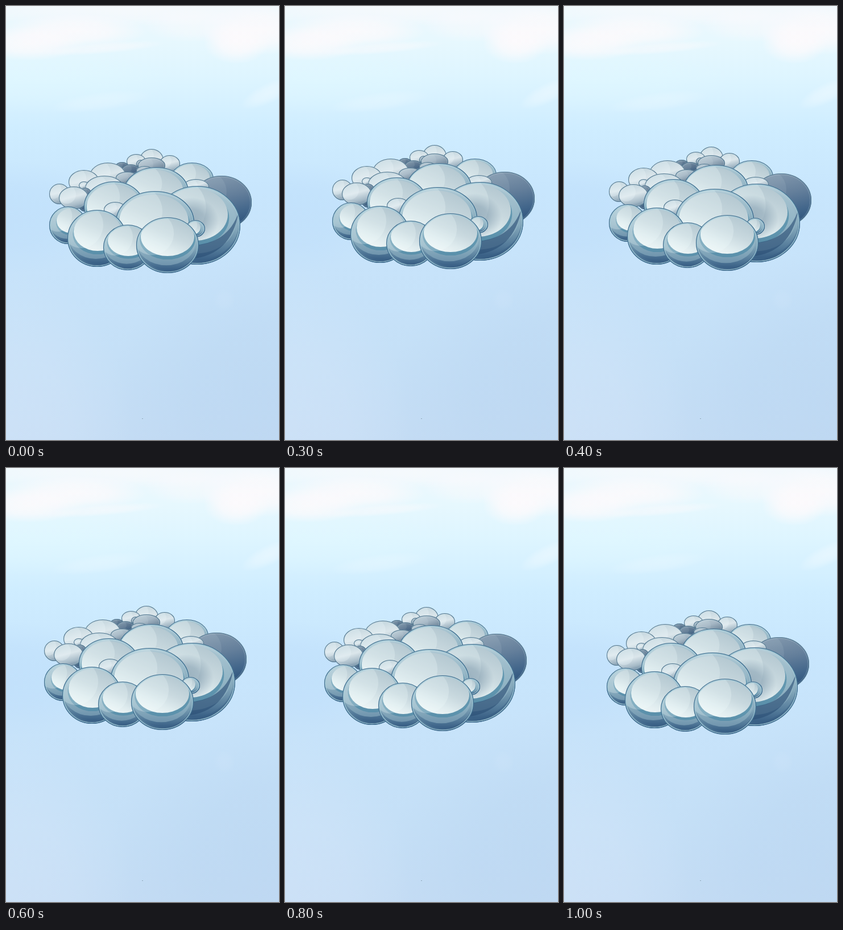
These frames come from a looping animation (480 by 762 pixels, 1.1 s). An HTML page with a canvas:

```html
<!DOCTYPE html>
<html lang="en">
<head>
<meta charset="utf-8">
<title>Drifting cloud</title>
<style>
html, body { margin: 0; width: 100%; height: 100%; overflow: hidden; }
canvas { display: block; width: 100%; height: 100%; }
</style>
</head>
<body>
<canvas id="stage" width="480" height="762"></canvas>
<script>
const W = 480, H = 762, LOOP = 1100;
const stage = document.getElementById('stage').getContext('2d');

function layer(paint) {
  const c = document.createElement('canvas');
  c.width = W;
  c.height = H;
  paint(c.getContext('2d'));
  return c;
}

function fade(g, x0, y0, x1, y1, stops) {
  const f = g.createLinearGradient(x0, y0, x1, y1);
  stops.forEach(([p, color]) => f.addColorStop(p, color));
  return f;
}

function oval(g, x, y, rx, ry, turn = 0) {
  g.beginPath();
  g.ellipse(x, y, rx, ry, turn, 0, Math.PI * 2);
}

// Soft elliptical puff
function puff(g, x, y, rx, ry, alpha, rgb = '253,250,252', turn = 0) {
  g.save();
  g.translate(x, y);
  g.rotate(turn);
  g.scale(rx, ry);
  const f = g.createRadialGradient(0, 0, 0, 0, 0, 1);
  f.addColorStop(0, `rgba(${rgb},${alpha})`);
  f.addColorStop(0.5, `rgba(${rgb},${alpha * 0.75})`);
  f.addColorStop(1, `rgba(${rgb},0)`);
  g.fillStyle = f;
  g.fillRect(-1, -1, 2, 2);
  g.restore();
}

const sky = layer(g => {
  g.fillStyle = fade(g, 0, 0, 0, H, [
    [0, '#edf8fd'], [0.08, '#e7f8fe'], [0.16, '#def5ff'], [0.28, '#cfedff'],
    [0.42, '#c8e6fd'], [0.6, '#c7e3fa'], [0.8, '#c5e0f7'], [1, '#c4dcf4']
  ]);
  g.fillRect(0, 0, W, H);
  puff(g, 480, 690, 300, 260, 0.5, '184,212,240');
  puff(g, 0, 740, 220, 280, 0.4, '216,232,250');
  puff(g, 0, 370, 190, 100, 0.35, '184,218,250');
  puff(g, 60, 130, 240, 60, 0.35, '226,250,255');
  puff(g, 240, 8, 330, 28, 0.5);
  puff(g, 40, 66, 100, 30, 0.85);
  puff(g, 120, 44, 130, 30, 0.85);
  puff(g, 170, 74, 110, 10, 0.5, '253,250,252', -0.08);
  puff(g, 405, 64, 58, 38, 0.9);
  puff(g, 450, 42, 110, 44, 0.9);
  puff(g, 330, 34, 90, 30, 0.45);
  puff(g, 165, 168, 90, 17, 0.25, '244,251,255', -0.13);
  puff(g, 462, 153, 55, 18, 0.45, '244,251,255', -0.45);
  puff(g, 384, 516, 20, 20, 0.15, '220,235,252');
  g.fillStyle = '#90a8ba';
  g.fillRect(239, 724, 2, 1);
});

const tones = {
  pale: [[0, '#c2d5dd'], [0.45, '#dbe6eb'], [0.8, '#a6bac7'], [1, '#718da4']],
  gray: [[0, '#b9cad4'], [0.4, '#a4b6c4'], [1, '#60798f']],
  dusk: [[0, '#7890a5'], [0.5, '#5c7690'], [1, '#3d5f81']],
  deep: [[0, '#8298ad'], [0.4, '#647f9b'], [0.75, '#41658a'], [1, '#2b5079']],
  glass: [[0, '#9dbdcb'], [0.45, '#789db3'], [0.8, '#507898'], [1, '#31577e']]
};

function bubble(g, tone, x, y, rx, ry, core) {
  g.save();
  oval(g, x, y, rx, ry);
  g.clip();
  g.fillStyle = fade(g, x - rx * 0.2, y - ry, x + rx * 0.2, y + ry, tones[tone]);
  g.fillRect(x - rx, y - ry, rx * 2, ry * 2);

  if (core) {
    const [cx, cy, cw, ch] = core;
    // Dark lower bowl, then thin teal shells around the pale core
    oval(g, x, y - ry * 0.04, rx * 0.96, ry * 0.93);
    g.fillStyle = fade(g, 0, y - ry, 0, y + ry, [
      [0, '#b9d0da'], [0.55, '#84a8bb'], [0.8, '#547b9a'], [1, '#2e547d']
    ]);
    g.fill();
    oval(g, x - rx * 0.04, y - ry * 0.1, rx * 0.94, ry * 0.82);
    g.fillStyle = 'rgba(155,188,203,0.48)';
    g.fill();
    oval(g, cx, cy + ch * 0.13, cw * 1.04, ch * 1.05);
    g.fillStyle = 'rgba(77,139,167,0.7)';
    g.fill();
    oval(g, cx, cy, cw, ch);
    g.fillStyle = fade(g, cx + cw * 0.35, cy - ch, cx - cw * 0.3, cy + ch, [
      [0, '#b4c8d1'], [0.45, '#c9d9df'], [0.75, '#deebee'], [1, '#edf5f6']
    ]);
    g.fill();
    oval(g, x - rx * 0.48, y - ry * 0.42, rx * 0.68, ry * 0.78, 0.45);
    g.fillStyle = 'rgba(238,250,252,0.25)';
    g.fill();
  } else {
    oval(g, x - rx * 0.45, y - ry * 0.3, rx * 0.6, ry * 0.8, 0.4);
    g.fillStyle = `rgba(238,248,252,${tone === 'pale' ? 0.28 : 0.08})`;
    g.fill();
  }

  // Bright inner rim
  oval(g, x, y, rx - 2, ry - 2);
  g.lineWidth = core ? 1.5 : 0.8;
  g.strokeStyle = core ? 'rgba(166,204,217,0.8)' : 'rgba(190,214,224,0.35)';
  g.stroke();
  g.restore();
  oval(g, x, y, rx - 0.5, ry - 0.5);
  g.lineWidth = 1.1;
  g.strokeStyle = core ? '#3e6c8e' : '#547991';
  g.stroke();
}

const cloud = layer(g => {
  const b = (...args) => bubble(g, ...args);
  b('pale', 256, 271, 21, 20);
  b('pale', 229, 273, 17, 13);
  b('pale', 288, 277, 18, 15);
  b('gray', 237, 277, 8, 7);
  b('gray', 256, 280, 24, 14);
  b('dusk', 204, 281, 11, 7);
  b('dusk', 219, 287, 15, 9);
  b('gray', 244, 289, 15, 8);
  b('pale', 179, 299, 32, 24);
  b('gray', 213, 302, 20, 11);
  b('pale', 327, 304, 38, 29, [325, 304, 34, 26]);
  b('deep', 379, 345, 53, 47);
  b('pale', 137, 309, 27, 21);
  b('pale', 94, 330, 18, 18);
  b('pale', 137, 315, 9, 7);
  b('pale', 173, 320, 34, 22);
  b('dusk', 139, 340, 15, 21);
  b('pale', 119, 337, 26, 20);
  b('pale', 334, 317, 23, 13);
  b('glass', 264, 326, 57, 43, [260, 326, 52, 39]);
  b('glass', 190, 352, 53, 44, [190, 352, 48, 39]);
  b('glass', 109, 385, 33, 33, [116, 377, 27, 22]);
  b('glass', 336, 385, 76, 69, [332, 366, 58, 46]);

  // Shade cast over the broad right-hand dome
  g.save();
  oval(g, 336, 385, 74, 67);
  g.clip();
  puff(g, 326, 378, 48, 42, 0.5, '86,118,143');
  g.fillStyle = 'rgba(42,78,117,0.62)';
  g.beginPath();
  g.moveTo(409, 362);
  g.quadraticCurveTo(390, 418, 326, 420);
  g.lineTo(326, 444);
  g.quadraticCurveTo(396, 437, 409, 362);
  g.fill();
  g.restore();

  b('pale', 192, 358, 20, 14);
  b('glass', 262, 380, 69, 55, [260, 378, 61, 47]);
  b('glass', 333, 391, 17, 15, [329, 389, 13, 12]);
  b('glass', 160, 408, 52, 50, [161, 396, 42, 34]);
  b('glass', 214, 424, 43, 40, [215, 412, 36, 27]);
  b('glass', 284, 420, 55, 49, [284, 405, 47, 34]);
});

// Start time and offset for each held pose
const poses = [
  [0, 0, 0], [100, 8, -8], [300, 7, -7], [400, 3, -4], [500, -1, -1],
  [600, -9, -9], [800, -7, -7], [900, -4, -4], [1000, -1, -1]
];

function draw(now) {
  const t = now % LOOP;
  const [, dx, dy] = poses.findLast(p => p[0] <= t) || poses[0];
  stage.drawImage(sky, 0, 0);
  stage.drawImage(cloud, dx, dy);
}

let start;
function tick(now) {
  start ??= now;
  draw(Math.max(0, now - start));
  requestAnimationFrame(tick);
}
draw(0);
requestAnimationFrame(tick);
</script>
</body>
</html>
```
